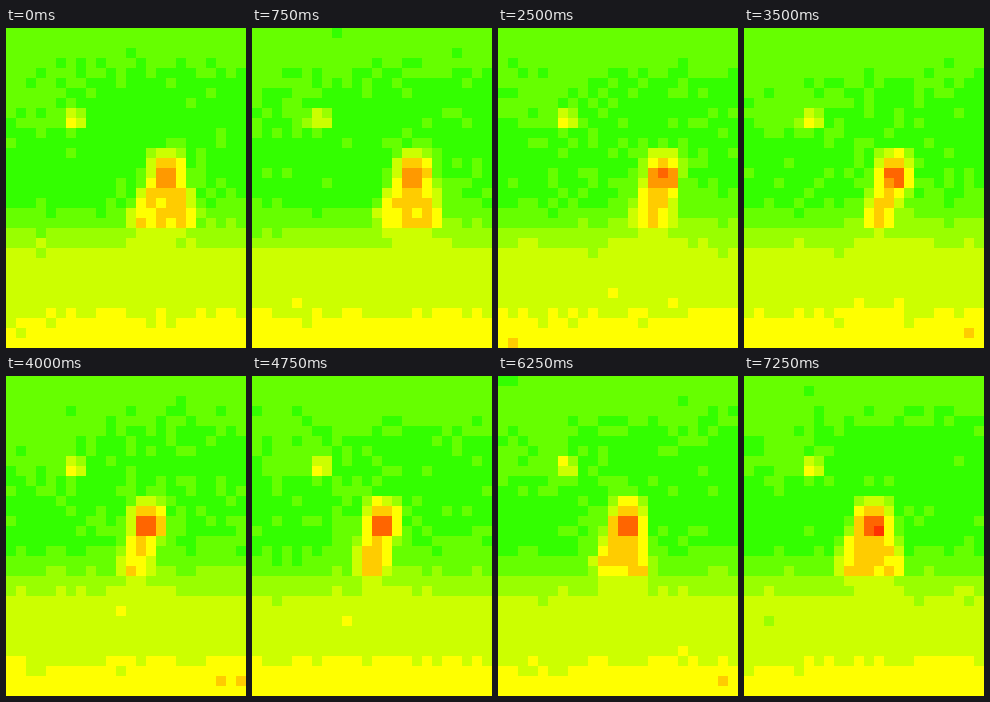
Recreate the animation shown at these times as a matplotlib script. Size 240x320 px, loop 7500 ms.

```python
import numpy as np
import matplotlib.pyplot as plt
from matplotlib.animation import FuncAnimation
from matplotlib.colors import ListedColormap

COLS, ROWS = 24, 32
FRAMES, INTERVAL = 30, 250

# Green through yellow to red in equal steps
palette = [(min(1, 0.2 * (k + 1)), min(1, 1 - 0.2 * (k - 4)), 0) for k in range(9)]
x, y = np.meshgrid(np.arange(COLS), np.arange(ROWS))

# The walk across the room
STEPS = [0, 10, 14, 19, 29]
HEAD_X = [15.6, 16, 14.5, 12.5, 12.4]
FEET_X = [15.3, 15, 13.2, 11.5, 12.2]


def smooth(start, end):
    u = np.clip((y - start) / (end - start), 0, 1)
    return u * u * (3 - 2 * u)


def bump(cx, cy, rx, ry):
    return np.exp(-((x - cx) / rx) ** 2 - ((y - cy) / ry) ** 2)


def glow(cx, half_width, top, bottom, heat, fade):
    """Even heat inside the shape, falling off with squared distance."""
    dx = np.maximum(np.abs(x - cx) - half_width, 0)
    dy = np.maximum(np.maximum(top - y, y - bottom), 0)
    return heat - fade * (dx ** 2 + dy ** 2)


def room():
    temp = 0.85 - 0.65 * smooth(0, 7) + 2.75 * smooth(16, 23.5) + 0.9 * smooth(25.5, 30.5)
    temp += 0.4 * bump(3, 7, 5, 3)
    temp += 0.3 * bump(22, 17, 4, 3)
    temp += 0.4 * (bump(0, 31, 1.5, 1) + bump(22, 30, 3, 2))
    return temp + np.random.default_rng(4).normal(0, 0.06, x.shape)


ROOM = room()


def person(frame):
    phase = frame / FRAMES
    head = np.interp(frame, STEPS, HEAD_X)
    feet = np.interp(frame, STEPS, FEET_X)
    stride = 1.1 + 0.9 * np.cos(2 * np.pi * phase)
    down = np.clip((y - 14) / 4, 0, 1)
    body = glow(head + (feet - head) * down, 0.3 + (stride - 0.3) * down,
                13.2, 18.8, 5 - 0.4 * down, 1.1)
    face = glow(head, 0.5, 14, 15, 6 + 1.4 * phase, 2.5)
    halo = 0.7 * bump((head + feet) / 2, 17, 3.5, 5)
    return np.maximum(body, face), halo


def thermal(frame):
    heat, halo = person(frame)
    spot = glow(6.2, 0, 8.6, 8.6, 4, 1.6)
    warmth = 0.12 * np.sin(np.pi * frame / FRAMES)
    temp = np.maximum.reduce([ROOM + warmth + halo, heat, spot])
    temp += np.random.default_rng(100 + frame).normal(0, 0.15, x.shape)
    return np.clip(np.rint(temp), 0, 8)


fig = plt.figure(figsize=(2.4, 3.2), dpi=100)
ax = fig.add_axes([0, 0, 1, 1])
ax.axis("off")
image = ax.imshow(thermal(0), cmap=ListedColormap(palette), vmin=-0.5, vmax=8.5,
                  interpolation="nearest", aspect="auto")


def update(frame):
    image.set_data(thermal(frame))
    return [image]


anim = FuncAnimation(fig, update, frames=FRAMES, interval=INTERVAL, repeat=True, repeat_delay=0)
plt.show()
```
